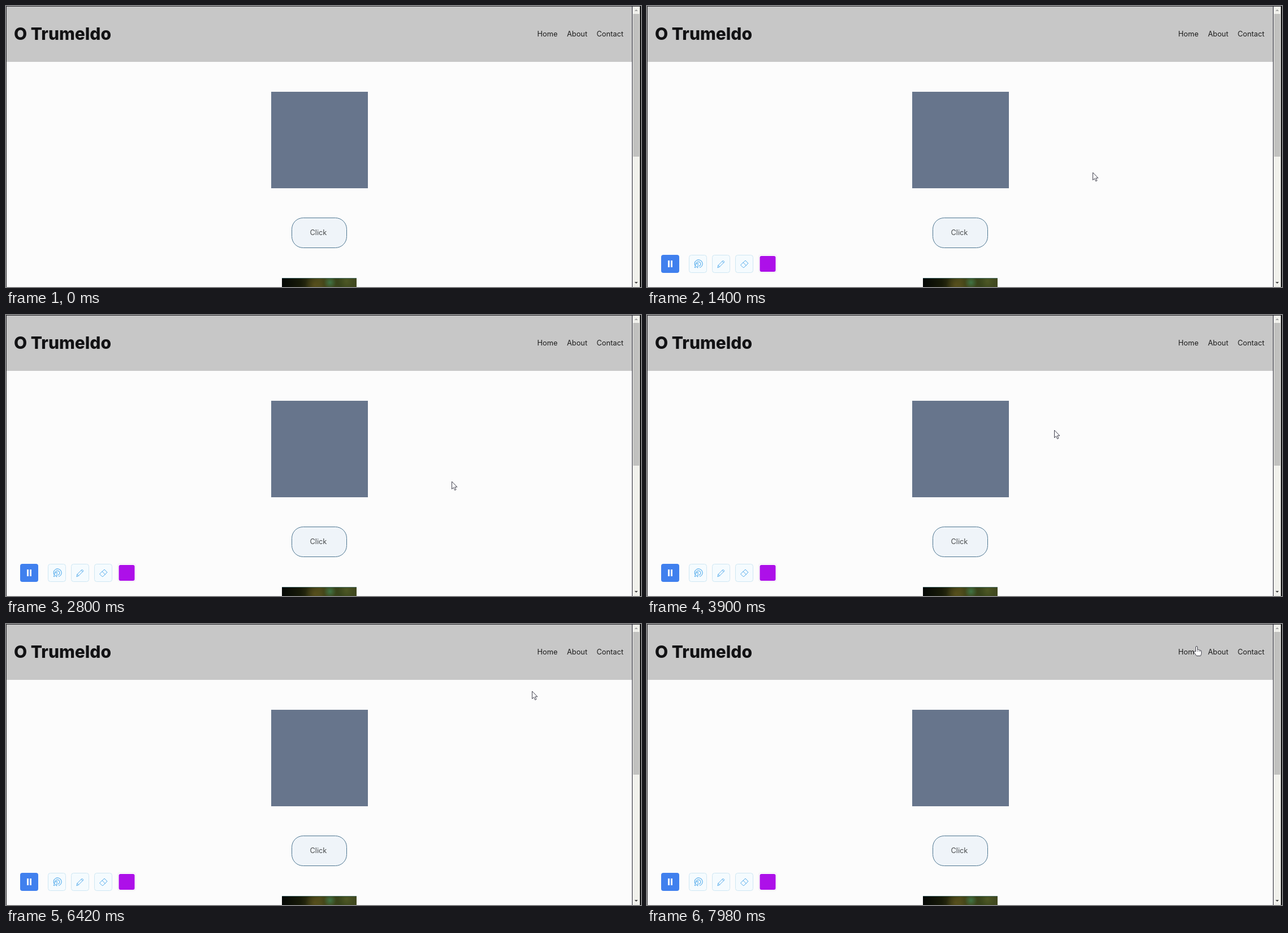
An HTML page with a canvas that plays this animation: 1123 px wide and 498 px high, repeating every 8000 ms.

```html
<!DOCTYPE html>
<html lang="pt">
<head>
<meta charset="utf-8">
<title>O Trumeldo</title>
<style>
html, body { margin: 0; width: 100%; height: 100%; overflow: hidden; background: #fcfcfc; }
canvas { display: block; }
</style>
</head>
<body>
<canvas id="stage" width="1123" height="498"></canvas>
<script>
const ctx = document.getElementById('stage').getContext('2d');
const LOOP = 8000;
const FONT = 'Inter, "Noto Sans", sans-serif';
const TOOLBAR_AT = 1000;
const POINTER_AT = 1400;

// Pointer rests at each stop, then eases there between start and end.
const START = { x: 788, y: 295 };
const MOVES = [
  { start: 2800, end: 3500, x: 720, y: 204 },
  { start: 6140, end: 6420, x: 930, y: 119 },
  { start: 7400, end: 7960, x: 972, y: 39 }
];

function rect(x, y, w, h, color) {
  ctx.fillStyle = color;
  ctx.fillRect(x, y, w, h);
}

function rounded(x, y, w, h, r, fill, stroke) {
  ctx.beginPath();
  ctx.roundRect(x, y, w, h, r);
  ctx.fillStyle = fill;
  ctx.fill();
  if (stroke) {
    ctx.strokeStyle = stroke;
    ctx.lineWidth = 1;
    ctx.stroke();
  }
}

function text(str, x, y, size, weight, color) {
  ctx.font = `${weight} ${size}px ${FONT}`;
  ctx.fillStyle = color;
  ctx.fillText(str, x, y);
}

function shape(d, x, y, fill, stroke, width = 1) {
  const path = new Path2D(d);
  ctx.save();
  ctx.translate(x, y);
  if (fill) {
    ctx.fillStyle = fill;
    ctx.fill(path);
  }
  if (stroke) {
    ctx.strokeStyle = stroke;
    ctx.lineWidth = width;
    ctx.lineJoin = ctx.lineCap = 'round';
    ctx.stroke(path);
  }
  ctx.restore();
}

function glow(x, y, r, rgb, alpha) {
  const g = ctx.createRadialGradient(x, y, 0, x, y, r);
  g.addColorStop(0, `rgba(${rgb},${alpha})`);
  g.addColorStop(1, `rgba(${rgb},0)`);
  rect(488, 482, 132, 16, g);
}

function photo() {
  const g = ctx.createLinearGradient(488, 0, 620, 0);
  g.addColorStop(0, '#050806');
  g.addColorStop(0.25, '#171a08');
  g.addColorStop(0.5, '#484719');
  g.addColorStop(0.8, '#35431b');
  g.addColorStop(1, '#434a20');
  rect(488, 482, 132, 16, g);
  glow(546, 494, 17, '105,92,34', 0.6);
  glow(573, 490, 11, '64,132,84', 0.75);
  glow(602, 488, 15, '92,100,42', 0.6);
  rect(488, 482, 132, 1, 'rgba(70,125,135,0.6)');
}

function scrollbar() {
  rect(1107, 0, 1, 498, '#222230');
  rect(1108, 1, 13, 497, '#f1f1ec');
  rect(1109, 14, 11, 253, '#c1c1bf');
  shape('M-3 2L0 -1L3 2Z', 1114.5, 7, '#a3a3a3');
  shape('M-3 -2L0 1L3 -2Z', 1114.5, 491, '#404040');
  rect(1121, 0, 2, 498, '#101010');
}

function page() {
  rect(0, 0, 1123, 498, '#fcfcfc');
  rect(0, 0, 1107, 99, '#c7c7c7');
  text('O Trumeldo', 14, 60, 30, 800, '#121214');
  text('Home', 939.5, 54, 12.8, 400, '#1c1c1c');
  text('About', 992, 54, 12.8, 400, '#1c1c1c');
  text('Contact', 1044.5, 54, 12.8, 400, '#1c1c1c');
  rect(469, 152, 171, 171, '#67758c');
  rounded(505.5, 375.5, 97, 53, 20, '#eff4f9', '#4c7590');
  text('Click', 537.5, 406, 12.8, 400, '#484b4d');
  photo();
  rect(0, 0, 1123, 1, '#242428');
  rect(0, 0, 1, 498, '#242428');
  scrollbar();
}

function toolbar() {
  const ink = '#55acec';
  rounded(25, 441, 32, 32, 4, '#4080ee');
  rect(37, 451, 3, 12, '#fff');
  rect(42, 451, 3, 12, '#fff');
  for (const x of [74, 115, 156]) {
    rounded(x + 0.5, 441.5, 31, 31, 4, '#f5fbfe', '#cfe7f3');
  }
  // click highlight, pencil, eraser
  shape('M-5 4A7 7 0 1 1 3 6.5M-3.5 1.5A4 4 0 1 1 1.5 4', 90.5, 457, null, ink, 1.1);
  shape('M-1 -1L-7 1.5L-4.5 3L-7 6L-6 7L-3 4.5L-1.5 7Z', 91, 457, '#f5fbfe', ink);
  shape('M-6 6.5L-5 2.5L3.5 -6L6 -3.5L-2.5 5ZM2 -4.5L4.5 -2M-5 2.5L-2.5 5', 131, 457, null, ink);
  shape('M-6.5 1.5L1.5 -6L6.5 -1L-1 6.5H-2.5L-6.5 2.5ZM-2.5 -2.5L3 3', 172.5, 457, null, ink);
  rounded(197.5, 440.5, 32, 32, 4, '#fcfafd', '#f1edf4');
  rounded(199.5, 443, 28, 28, 3, '#ad10e9');
}

function pointerAt(t) {
  let p = START;
  for (const m of MOVES) {
    if (t < m.start) break;
    const u = Math.min(1, (t - m.start) / (m.end - m.start));
    const k = u * u * (3 - 2 * u);
    p = { x: p.x + (m.x - p.x) * k, y: p.y + (m.y - p.y) * k };
  }
  return { x: Math.round(p.x), y: Math.round(p.y) };
}

function pointer(t) {
  const { x, y } = pointerAt(t);
  const overLink = x > 939 && x < 976 && y < 60;
  if (overLink) {
    shape('M-1.5 9V1.5Q-1.5 0 0 0T1.5 1.5V6Q3.5 5 4.3 6.7Q6 6 6.5 7.5Q8.5 7 8.5 9V12Q8.5 14 7 17H0L-4.5 11Q-5 9 -3 8.8Z',
      x, y + 0.5, '#fff', '#30303c', 0.9);
    shape('M1.5 6V9.5M4.3 7V9.5M6.5 8V9.5', x, y + 0.5, null, '#55555f', 0.7);
  } else {
    shape('M0 0V13L3 10.2L5.2 15L7.4 14L5.2 9.4H9Z', x + 0.5, y + 0.5, '#fff', '#2c2c3a', 0.9);
  }
}

function draw(now) {
  const t = now % LOOP;
  page();
  if (t >= TOOLBAR_AT) toolbar();
  if (t >= POINTER_AT) pointer(t);
  requestAnimationFrame(draw);
}
requestAnimationFrame(draw);
</script>
</body>
</html>
```
